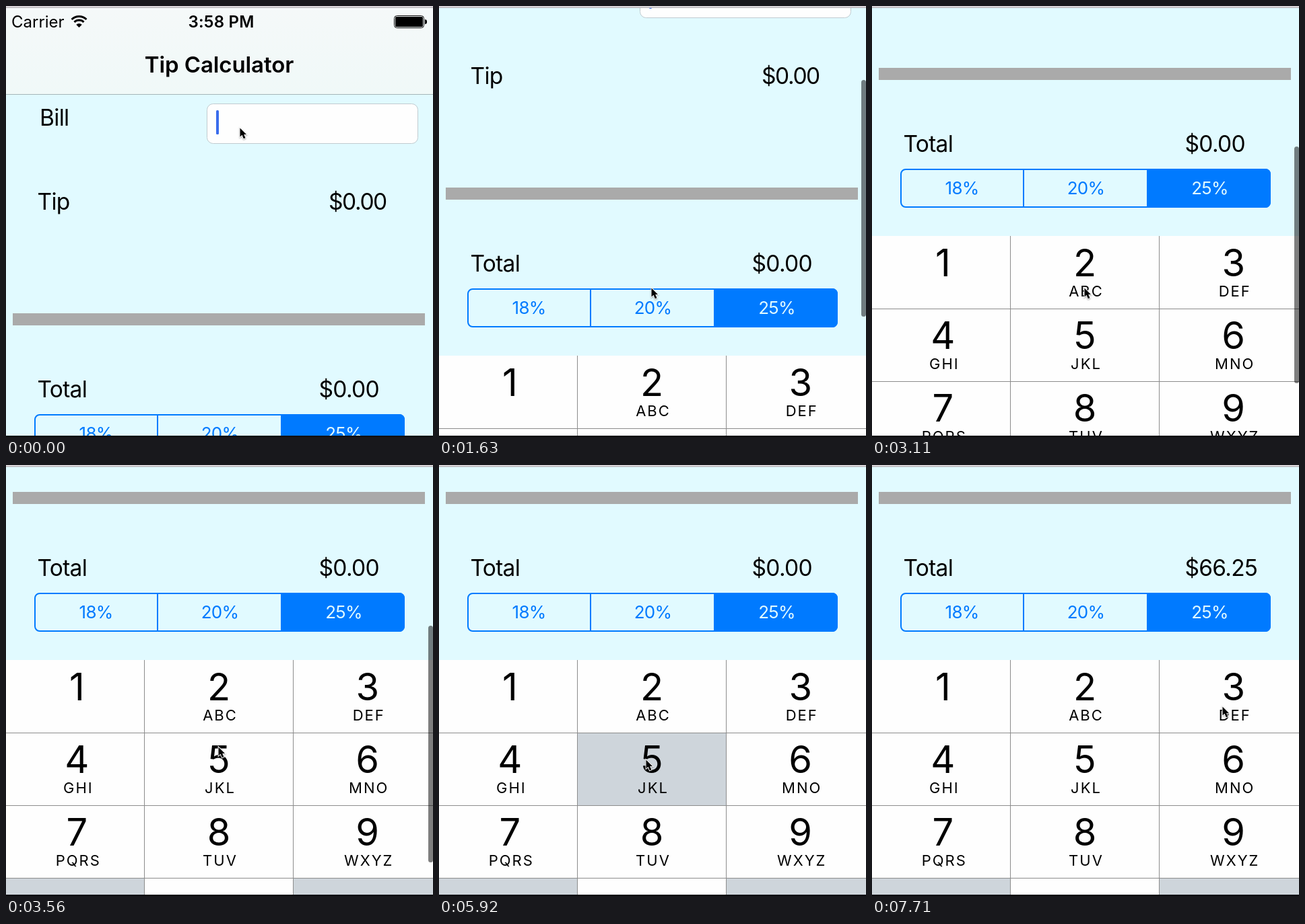
An HTML page with a canvas for the animation above (8000 ms loop, 634 by 641 pixels).

```html
<!DOCTYPE html>
<html lang="en">
<head>
<meta charset="utf-8">
<title>Tip Calculator</title>
<style>
html, body { margin: 0; width: 100%; height: 100%; overflow: hidden; background: #e1faff; }
canvas { display: block; }
</style>
</head>
<body>
<canvas id="stage" width="634" height="641"></canvas>
<script>
const ctx = document.getElementById('stage').getContext('2d');
const LOOP = 8000, TICKS = 54;
const SKY = '#e1faff', BLUE = '#007aff', GREY = '#ced5db', KEY = '#fefefe', LINE = '#8c8c8c';
const KEYS_TOP = 707, ROW = 108;
const LETTERS = ' ABC DEF GHI JKL MNO PQRS TUV WXYZ'.split(' ');

// Motion: everything depends on the current tick
const progress = (t, from, to) => Math.min(1, Math.max(0, (t - from) / (to - from)));
const ease = k => Math.sin(k * Math.PI / 2) ** 1.83;
const mix = (a, b, k) => a + (b - a) * k;

// Three flicks of the page
const scrollAt = t => Math.round(
  352 * ease(progress(t, 7, 15)) + 13 * ease(progress(t, 15, 17)) + 52 * ease(progress(t, 21, 24)));

const barAlphaAt = t => t < 4 ? 0 : .5 * (1 - progress(t, 25, 29));

function pointerAt(t) {
  if (t < 1) return [347, 181];
  if (t < 32) {
    const k = progress(t, 25, 29);
    return [mix(315, 345, k), mix(419, 440, k)];
  }
  if (t < 40) { // one lap around the middle key
    const a = (t - 32) / 8 * 2 * Math.PI;
    return [356 - 49 * Math.cos(a), 409 + 55 * Math.sin(a + .56)];
  }
  const k = ease(progress(t, 41, 46));
  return [mix(307, 520, k), mix(438, 359, k)];
}

// Drawing helpers
function rect(x, y, w, h, fill) {
  ctx.fillStyle = fill;
  ctx.fillRect(x, y, w, h);
}

function round(x, y, w, h, r, fill, stroke, line = 1) {
  ctx.beginPath();
  ctx.roundRect(x, y, w, h, r);
  if (fill) { ctx.fillStyle = fill; ctx.fill(); }
  if (stroke) { ctx.strokeStyle = stroke; ctx.lineWidth = line; ctx.stroke(); }
}

function text(str, x, y, size, { align = 'left', weight = 400, spacing = 0, color = '#000' } = {}) {
  ctx.font = `${weight} ${size}px Inter, sans-serif`;
  ctx.letterSpacing = spacing + 'px';
  ctx.textAlign = align;
  ctx.fillStyle = color;
  ctx.fillText(str, x, y);
}

const label = (str, x, y, spacing = -.7) => text(str, x, y, 33.5, { spacing });

function drawHeader() {
  const g = ctx.createLinearGradient(0, 3, 0, 131);
  g.addColorStop(0, '#f5f9f9');
  g.addColorStop(1, '#f0f9f8');
  rect(0, 0, 634, 131, g);
  rect(0, 131, 634, 1, '#a5b5b8');
  text('Carrier', 8, 32, 24);
  text('3:58 PM', 319.5, 32, 24, { align: 'center', weight: 600, spacing: .2 });
  text('Tip Calculator', 316.5, 99, 33, { align: 'center', weight: 600, spacing: -.1 });

  // Wi-Fi
  const fan = [-Math.PI * .75, -Math.PI * .25];
  ctx.strokeStyle = ctx.fillStyle = '#000';
  ctx.lineWidth = 3;
  for (const r of [10, 15.5]) {
    ctx.beginPath();
    ctx.arc(108.5, 31, r, ...fan);
    ctx.stroke();
  }
  ctx.beginPath();
  ctx.moveTo(108.5, 32);
  ctx.arc(108.5, 32, 6, ...fan);
  ctx.fill();

  // Battery
  round(576.5, 14.5, 44, 18, 4, null, '#000');
  round(578, 16, 41, 15, 2, '#000');
  round(622, 20, 3, 7, [0, 3, 3, 0], '#000');
}

function drawForm(total) {
  label('Bill', 50, 178);
  round(298.5, 145.5, 313, 59, 9, KEY, '#c0cbd0');
  round(312, 155, 4, 36, 1.5, '#3a6cec');
  label('Tip', 46.5, 302.5);
  label('$0.00', 479, 303, -1.4);
  rect(10, 457, 612, 18, '#aaa');
  label('Total', 46.5, 582);
  label(total, 464.5, 582);

  round(43, 608, 548, 56, 7, null, BLUE, 2);
  rect(224, 608, 2, 56, BLUE);
  round(408, 607, 184, 58, [0, 8, 8, 0], BLUE);
  ['18%', '20%', '25%'].forEach((s, i) =>
    text(s, 133.5 + 184 * i, 645, 26, { align: 'center', spacing: -.8, color: i === 2 ? SKY : BLUE }));
}

function drawKeys(pressed) {
  const edges = [-1, 205, 426, 634];
  const bottom = KEYS_TOP + 3 * ROW;
  rect(0, KEYS_TOP, 634, 4 * ROW, KEY);
  rect(0, bottom, 205, ROW, GREY);
  rect(427, bottom, 207, ROW, GREY);
  LETTERS.forEach((letters, i) => {
    const col = i % 3, y = KEYS_TOP + ROW * Math.floor(i / 3), mid = 105.3 + 215.7 * col - (col === 1 ? 5 : 0);
    if (pressed === i + 1) rect(edges[col] + 1, y, edges[col + 1] - edges[col] - 1, ROW, GREY);
    text(i + 1, mid, y + 60, 56, { align: 'center' });
    text(letters, mid + 2, y + 90, 22, { align: 'center', spacing: 2 });
  });
  for (const x of [205, 426]) rect(x, KEYS_TOP, 1, 4 * ROW, LINE);
  for (let r = 1; r < 4; r++) rect(0, KEYS_TOP + ROW * r, 634, 1, LINE);
}

const ARROW = new Path2D('M0 0V13L3 10.3L5.3 15.8L8 14.7L5.7 9.4H9.5Z');

function drawPointer(x, y) {
  ctx.save();
  ctx.translate(x + .5, y + .5);
  ctx.shadowColor = 'rgba(0,0,0,.35)';
  ctx.shadowBlur = 2;
  ctx.shadowOffsetY = 1;
  ctx.strokeStyle = '#fff';
  ctx.lineWidth = 1.8;
  ctx.stroke(ARROW);
  ctx.shadowColor = 'transparent';
  ctx.fillStyle = '#000';
  ctx.fill(ARROW);
  ctx.restore();
}

function draw() {
  // The screen refreshes in whole ticks
  const tick = Math.floor((performance.now() % LOOP + 9) / LOOP * TICKS) % TICKS;
  const scroll = scrollAt(tick), alpha = barAlphaAt(tick);
  const total = tick < 41 ? '$0.00' : tick < 52 ? '$6.25' : '$66.25';
  const pressed = tick === 40 ? 5 : tick === 51 ? 3 : 0;

  rect(0, 0, 634, 641, SKY);
  ctx.save();
  ctx.translate(0, -scroll);
  drawHeader();
  drawForm(total);
  drawKeys(pressed);
  ctx.restore();

  if (alpha) round(627, Math.round(5 + scroll * .56), 7, 352, 3.5, `rgba(0,0,0,${alpha})`);
  rect(0, 0, 634, 2, '#d8d4d8');
  rect(0, 2, 634, 1, '#b4b2b5');
  rect(0, 639, 634, 2, '#101014');
  drawPointer(...pointerAt(tick));
  requestAnimationFrame(draw);
}
draw();
</script>
</body>
</html>
```
